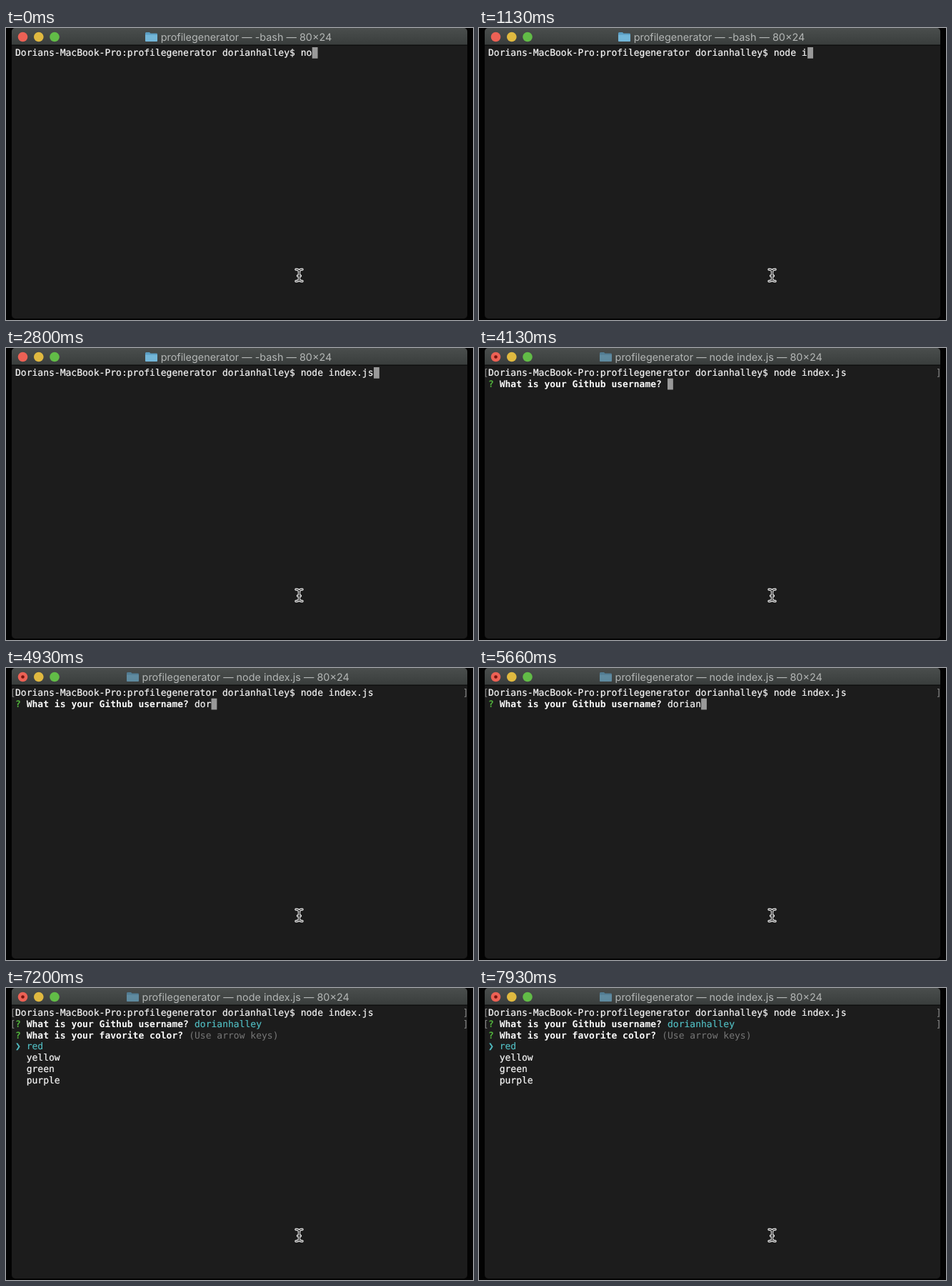
An HTML page that plays this animation: 654x410 px, repeating every 8 s.

```html
<!DOCTYPE html>
<html lang="en">
<head>
<meta charset="utf-8">
<title>Terminal session</title>
<style>
  html, body { margin: 0; width: 100%; height: 100%; overflow: hidden; background: #000; }
  svg { display: block; width: 654px; height: 410px; }
  text { white-space: pre; text-rendering: geometricPrecision; }
  #screen text { font: 13.03px "DejaVu Sans Mono", "Liberation Mono", monospace; }
  #screen .plain { fill: #f4f4f4; stroke: #f4f4f4; stroke-width: .22px; }
  #screen .bold { fill: #fafafa; font-weight: 700; }
  #screen .green { fill: #52b43c; font-weight: 700; }
  #screen .cyan { fill: #52bfc4; stroke: #52bfc4; stroke-width: .15px; }
  #screen .gray { fill: #777; }
  #screen .mark { fill: #8c8c8c; }
  #title { font: 14.4px Inter, Roboto, sans-serif; fill: #b4b7b6; text-anchor: middle; }
</style>
</head>
<body>
<svg viewBox="0 0 654 410" xmlns="http://www.w3.org/2000/svg">
  <defs>
    <linearGradient id="bar" x1="0" y1="0" x2="0" y2="1">
      <stop offset="0" stop-color="#4a4e4d"/>
      <stop offset="1" stop-color="#393d3c"/>
    </linearGradient>
    <clipPath id="frame"><rect x="8" y="0" width="638" height="408" rx="5"/></clipPath>
  </defs>
  <rect width="654" height="410" fill="#030303"/>
  <g clip-path="url(#frame)">
    <rect x="8" width="638" height="408" fill="#1c1c1c"/>
    <rect x="8" width="638" height="24" fill="url(#bar)"/>
    <rect x="8" y="23.5" width="638" height="1.2" fill="#0b0b0b"/>
  </g>
  <circle cx="23.5" cy="12.5" r="6.8" fill="#ec6155"/>
  <circle cx="45.8" cy="12.5" r="6.8" fill="#e0b940"/>
  <circle cx="68" cy="12.5" r="6.8" fill="#62bc47"/>
  <circle id="busyDot" cx="23.5" cy="12.5" r="2.3" fill="#76130e"/>
  <g id="folder">
    <path d="M0 7.5 Q0 6 1.3 6 H6 L7.5 7.6 H15.8 Q17 7.6 17 9 V17.5 Q17 19 15.6 19 H1.4 Q0 19 0 17.5Z" fill="#5a9dc2"/>
    <path d="M0 9.6 H17 V17.5 Q17 19 15.6 19 H1.4 Q0 19 0 17.5Z" fill="#73b6d8"/>
  </g>
  <text id="title" y="18"></text>
  <g id="screen"></g>
  <g fill="none" stroke-linecap="round" stroke-linejoin="round">
    <path id="beam" d="M406 339 Q410 339 410.5 341.5 Q411 339 415 339 M410.5 341.5 V353 M406 355.5 Q410 355.5 410.5 353 Q411 355.5 415 355.5 M408.5 348 H412.5" stroke="#f5f5f5" stroke-width="3.4"/>
    <use href="#beam" id="beamCore"/>
    <path d="M406 339 Q410 339 410.5 341.5 Q411 339 415 339 M410.5 341.5 V353 M406 355.5 Q410 355.5 410.5 353 Q411 355.5 415 355.5 M408.5 348 H412.5" stroke="#161616" stroke-width="1.2"/>
  </g>
</svg>
<script>
const LOOP = 8000;
const LEFT = 13, TOP = 27, CELL = 7.844, LINE = 15.75;
const USER = "dorianhalley";
const PROMPT = `Dorians-MacBook-Pro:profilegenerator ${USER}$ `;
const COMMAND = "node index.js";
const ASK_NAME = "What is your Github username?";
const ASK_COLOR = "What is your favorite color?";
const COLORS = ["red", "yellow", "green", "purple"];

// Key press times; the first two command letters are already typed.
const COMMAND_KEYS = [0, 0, 260, 530, 800, 1130, 1330, 1600, 1860, 2060, 2260, 2530, 2800];
const NAME_KEYS = [4260, 4400, 4860, 5130, 5400, 5660, 5730, 5930, 6130, 6330, 6530, 6730];
const RUN = 3000, BUSY = 3130, ASK = 3400, ANSWERED = 7060;

const byId = id => document.getElementById(id);
const screen = byId("screen"), title = byId("title");
byId("beamCore").remove();

const typed = (text, keys, t) => text.slice(0, keys.filter(k => k <= t).length);

function add(tag, attrs, content = "") {
  const el = document.createElementNS("http://www.w3.org/2000/svg", tag);
  for (const key in attrs) el.setAttribute(key, attrs[key]);
  el.textContent = content;
  screen.append(el);
}

function put(row, col, content, style) {
  add("text", { x: LEFT + col * CELL, y: TOP + 12.1 + row * LINE, class: style }, content);
}

function caret(row, col) {
  add("rect", { x: LEFT + col * CELL, y: TOP + row * LINE, width: CELL, height: LINE, fill: "#999" });
}

function brackets(row) {
  put(row, -0.93, "[", "mark");
  put(row, 79.9, "]", "mark");
}

function question(row, content) {
  put(row, 0, "?", "green");
  put(row, 2, content, "bold");
  return content.length + 3;
}

function drawTitle(busy) {
  title.textContent = `profilegenerator — ${busy ? "node index.js" : "-bash"} — 80×24`;
  title.setAttribute("x", busy ? 335.7 : 336.5);
  byId("folder").setAttribute("transform", `translate(${busy ? 169 : 195} 0)`);
  byId("folder").setAttribute("opacity", busy ? 0.62 : 1);
  byId("busyDot").setAttribute("visibility", busy ? "visible" : "hidden");
}

function drawScreen(t) {
  screen.replaceChildren();
  const line = PROMPT + typed(COMMAND, COMMAND_KEYS, t);
  put(0, 0, line, "plain");
  if (t < RUN) return caret(0, line.length);

  brackets(0);
  if (t < ASK) return caret(1, 0);

  const nameCol = question(1, ASK_NAME);
  const name = typed(USER, NAME_KEYS, t);
  const answered = t >= ANSWERED;
  put(1, nameCol, name, answered ? "cyan" : "plain");
  if (!answered) return caret(1, nameCol + name.length);

  brackets(1);
  put(2, question(2, ASK_COLOR), "(Use arrow keys)", "gray");
  put(3, 0, "❯", "cyan");
  COLORS.forEach((color, i) => put(3 + i, 2, color, i ? "plain" : "cyan"));
}

const STEPS = [...COMMAND_KEYS, RUN, BUSY, ASK, ...NAME_KEYS, ANSWERED];
const start = performance.now();
let shown = -1;

function tick() {
  const t = (performance.now() - start) % LOOP;
  const step = STEPS.filter(s => s <= t).length;
  if (step !== shown) {
    shown = step;
    drawTitle(t >= BUSY);
    drawScreen(t);
  }
  requestAnimationFrame(tick);
}
tick();
</script>
</body>
</html>
```
